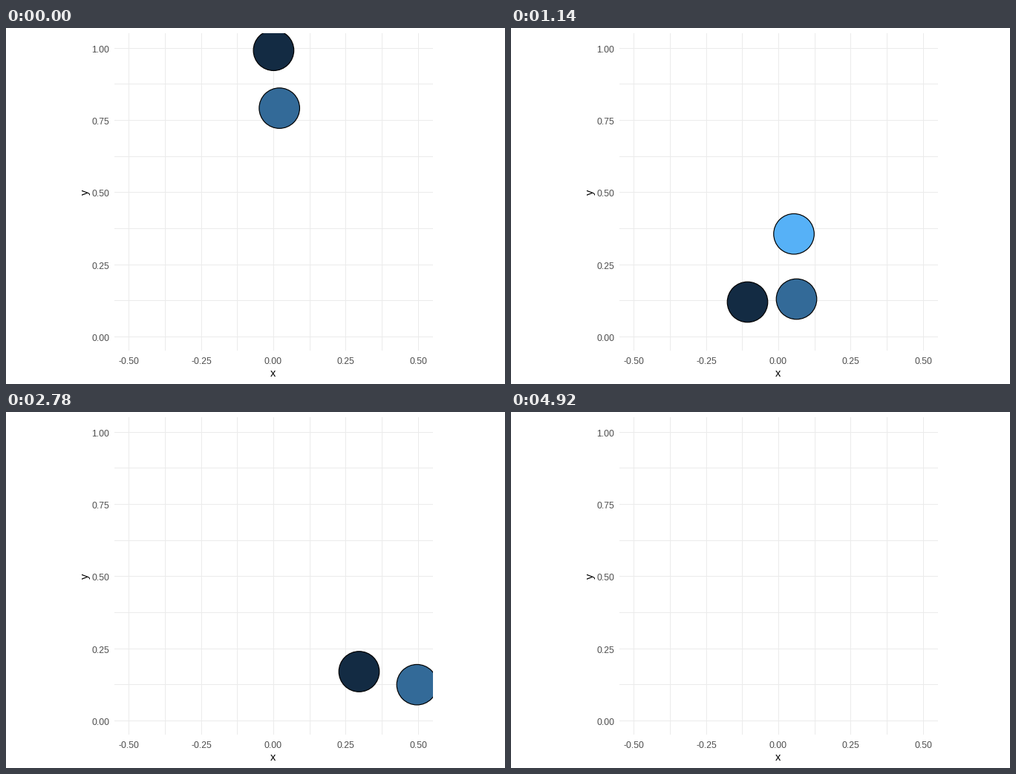
These frames come from a looping animation (672x480 px, 6.47 s). A matplotlib script:

```python
import numpy as np
import matplotlib.pyplot as plt
from matplotlib.animation import FuncAnimation
from matplotlib.collections import LineCollection
from matplotlib.patches import Circle, Rectangle

W, H, DPI = 672, 480, 96
LOOP, TICK = 6470, 10           # ms
LAST_MOVE, LAST_STEP = 4920, 106
UNIT = 389.5                    # pixels per axis unit
X0, Y0 = 360.4, 416.5           # pixel place of (0, 0)
LEFT, TOP, RIGHT, BOTTOM = 146, 7, 575, 435
GRAVITY = 1.0595                # pixels per step squared
FLOOR = 393                     # centre of a ball on the ground
KEEP = 0.7                      # share of hop time kept by a bounce

plt.rcParams["font.family"] = "Liberation Sans"


def fall(x, y, steps=23):
    """Drop from rest at an axis position, beginning two steps early."""
    px, py = X0 + UNIT * x, Y0 - UNIT * y
    return [(-2, px, py),
            (steps - 2, px, py + GRAVITY * steps * (steps + 1) / 2)]


def bounces(start, hop, speed, count=8):
    """Ever shorter hops along the floor at a steady sideways speed."""
    k, x, _ = start
    path = [start]
    for _ in range(count):
        k, x = k + hop, x + speed * hop
        path.append((k, x, FLOOR))
        hop *= KEEP
    return path


# Contacts as (step, x, y) in pixels; free flight in between.
dark = (fall(0, 1)
        + [(22, 359, 344), (25, 318.5, 369.5), (26, 303, 358),
           (44, 404.2, 329), (50, 428, 398), (59, 475.5, 350)]
        + bounces((69, 522.7, 395), hop=12, speed=2.2))
mid = (fall(0.02, 0.8)
       + [(22, 369, 409), (25, 384.5, 365.5), (34, 442, 392),
          (44, 516.7, 365.5)]
       + bounces((48, 526.5, 398), hop=15.6, speed=2.45))
light = (fall(0.01, 1.2)
         + [(22, 365, 256), (25, 381, 277.7), (27, 392.7, 298),
            (44, 526.5, 317), (55, 636, 342)])


def step_at(ms):
    """Steps come in groups of three: shown for 20, 100 and 20 ms."""
    if ms >= LAST_MOVE:
        return LAST_STEP
    group, rest = divmod(ms, 140)
    return 3 * group + (rest >= 20) + (rest >= 120)


def position(path, step):
    k, x, y = np.array(path).T
    step = min(step, k[-1])
    i = min(np.searchsorted(k, step, side="right") - 1, len(k) - 2)
    lift = GRAVITY / 2 * (step - k[i]) * (k[i + 1] - step)
    return np.interp(step, k, x), np.interp(step, k, y) - lift


fig = plt.figure(figsize=(W / DPI, H / DPI), dpi=DPI, facecolor="white")
ax = fig.add_axes([0, 0, 1, 1])
ax.set_xlim(0, W)
ax.set_ylim(H, 0)
ax.axis("off")

# Grid lines sit on pixel centres, so they stay one pixel wide.
px = 72 / DPI
cols = [int(X0 + UNIT * i / 8) for i in range(-4, 5)]
rows = [int(Y0 - UNIT * i / 8) for i in range(9)]
lines = [[(c + 0.5, TOP), (c + 0.5, BOTTOM)] for c in cols]
lines += [[(LEFT, r + 0.5), (RIGHT, r + 0.5)] for r in rows]
ax.add_collection(LineCollection(lines, colors="#EBEBEB", linewidths=px,
                                 snap=False, zorder=1))

tick = dict(fontsize=9.2, color="#4D4D4D", va="baseline")
for i in range(5):
    ax.text(cols[2 * i], 453, f"{-0.5 + 0.25 * i:.2f}", ha="center", **tick)
    ax.text(139.3, rows[2 * i] + 6, f"{0.25 * i:.2f}", ha="right", **tick)
ax.text(359.7, 470, "x", fontsize=11, ha="center", va="baseline")
ax.text(111, 221.5, "y", fontsize=11, ha="center", va="baseline",
        rotation=90, rotation_mode="anchor")

panel = Rectangle((LEFT, TOP), RIGHT - LEFT, BOTTOM - TOP,
                  transform=ax.transData)
balls = []
for z, (path, fill) in enumerate([(dark, "#132B43"), (mid, "#336A98"),
                                  (light, "#56B1F7")]):
    ball = Circle((0, 0), 0.07 * UNIT, facecolor=fill, edgecolor="black",
                  linewidth=1.2 * px, zorder=3 + z)
    ax.add_patch(ball)
    ball.set_clip_path(panel)
    balls.append((ball, path))


def draw(i):
    step = step_at(i * TICK)
    for ball, path in balls:
        ball.center = position(path, step)
    return [ball for ball, _ in balls]


anim = FuncAnimation(fig, draw, frames=LOOP // TICK, interval=TICK,
                     repeat=True, repeat_delay=0, blit=False)
plt.show()
```
